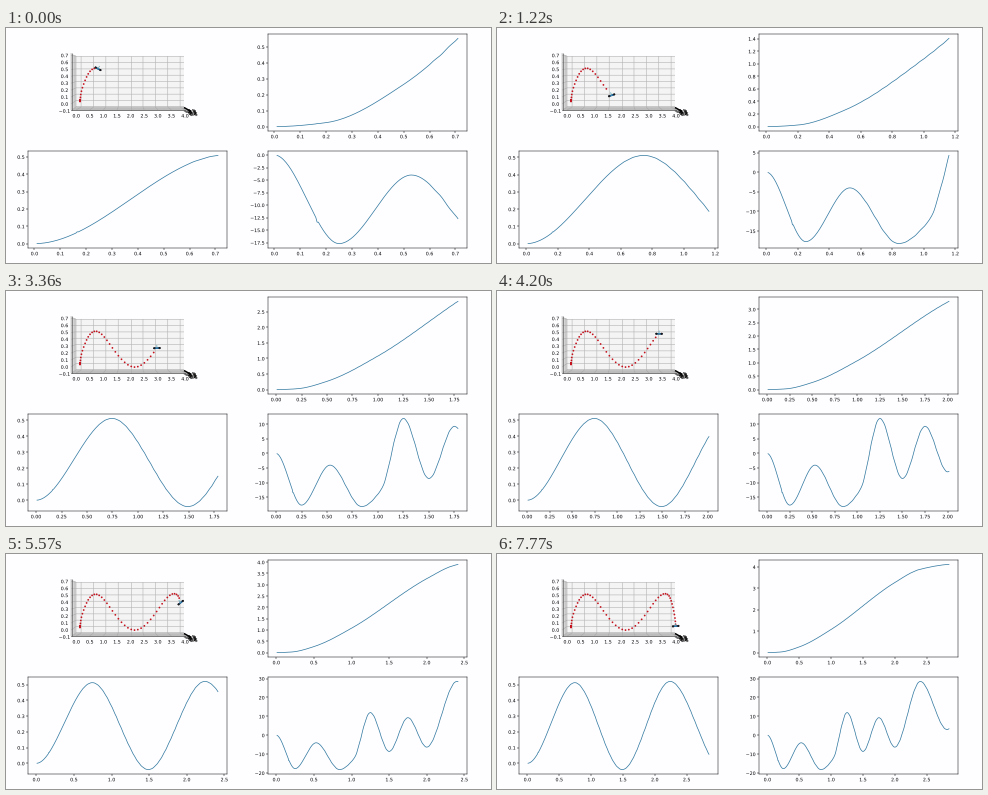
Write a matplotlib script that moves like this. It is 485 by 235 pixels and loops after 7870 ms.

```python
import numpy as np
import matplotlib.pyplot as plt
from matplotlib import patheffects
from matplotlib.animation import FuncAnimation

W, H, DPI = 485, 235, 32
LOOP_MS, FRAMES = 7870, 89
PAPER, RED, BLUE = "#fefdff", "#c41420", "#2f789f"

plt.rcParams.update({
    "font.family": "DejaVu Sans",
    "font.size": 10.6,
    "path.effects": [patheffects.Normal()],  # outlines keep tiny text crisp
    "axes.facecolor": PAPER,
    "axes.linewidth": 1.1,
    "lines.linewidth": 1.6,
})
for axis in ("xtick", "ytick"):
    plt.rcParams.update({f"{axis}.major.size": 3.7, f"{axis}.major.pad": 3.7,
                         f"{axis}.major.width": 1.1})


def curve(*points):
    """Monotone cubic through (t, value) points."""
    tk, vk = np.array(points).T
    h = np.diff(tk)
    d = np.diff(vk) / h
    a, b = d[:-1], d[1:]
    same = a * b > 0
    m = np.zeros(len(tk))
    m[1:-1][same] = 2 * (a * b)[same] / (a + b)[same]

    def f(t):
        i = np.clip(np.searchsorted(tk, t) - 1, 0, len(h) - 1)
        s = (t - tk[i]) / h[i]
        ease = s * s * (3 - 2 * s)
        return (vk[i] + ease * (vk[i + 1] - vk[i])
                + h[i] * s * (1 - s) * ((1 - s) * m[i] - s * m[i + 1]))
    return f


forward = curve((0, 0), (.2, .025), (.5, .265), (1, 1.08),
                (2, 3.27), (2.4, 3.89), (2.9, 4.12))
height = curve((0, 0), (.745, .512), (1.49, -.04), (2.24, .52), (3.07, -.04))
pitch = curve((0, 0), (.25, -17.7), (.53, -4), (.84, -18.2), (1.03, -12.5),
              (1.25, 12), (1.5, -8.6), (1.75, 9.3), (2, -6.3), (2.4, 28.5),
              (2.82, 3))
sim_time = curve((0, .71), (13, 1.16), (37, 1.76), (62, 2.4), (87, 2.85))


def sim_time(k):
    return np.interp(k, [0, 13, 37, 62, 87], [.71, 1.16, 1.76, 2.4, 2.85])


# Logged samples: one late update early on, a faint stutter later
log_t = np.arange(.01, 2.86, .005)
seen_t = np.where((log_t > .16) & (log_t < .17), .17, log_t)
seen_t = seen_t + .0015 * np.sin(2 * np.pi * log_t / .06) * (log_t > .6)

fig = plt.figure(figsize=(W / DPI, H / DPI), dpi=DPI, facecolor=PAPER)


def panel(x, top, f):
    ax = fig.add_axes([x / W, 1 - (top + 97) / H, 199 / W, 97 / H])
    line, = ax.plot([], [], color=BLUE)
    return ax, line, f(seen_t)


panels = [panel(262, 6, forward), panel(22, 123, height), panel(262, 123, pitch)]

# Side view of the flight, drawn in pixel coordinates
view = fig.add_axes([0, 0, 1, 1])
view.set(xlim=(0, W), ylim=(H, 0))
view.axis("off")


def project(x, z, depth):
    """Depth 1 is the front edge, .91 the back pane."""
    return 124.6 + depth * 27.2 * (x - 2), 37 + depth * (39 - 69.4 * z)


def rule(xs, ys, color="#b4b4b4", lw=1.3):
    view.plot(xs, ys, color=color, lw=lw, solid_capstyle="butt")


def label(x, y, value):
    view.text(x, y, f"{value:.1f}".replace("-", "\u2212"),
              ha="center", va="center")


view.fill([70, 178, 178, 70], [28, 28, 79, 79], color="#f4f4f4", lw=0)
view.fill([65, 70, 70, 65], [25, 28, 79, 82], color="#e4e4e4", lw=0)
view.fill([65, 70, 178, 180], [82, 79, 79, 82], color="#dedede", lw=0)

for z in np.arange(-1, 8) / 10:
    y = project(0, z, 1)[1]
    back = project(0, z, .91)[1]
    rule([65, 70, 178], [y, back, back])
    label(58.5, y + .3, z)
for x in np.arange(0, 4.1, .5):
    front = project(x, 0, 1)[0]
    back = project(x, 0, .91)[0]
    rule([back, back, front], [28, 79, 82])
    label(front, 88, x)
for u in np.linspace(0, 1, 5):
    rule([65 + 5 * u] * 2, [25 + 3 * u, 82 - 3 * u], "#a0a0a0", 1)
    rule([65 + 5 * u, 180 - 2 * u], [82 - 3 * u] * 2, "#a0a0a0", 1)
rule([65.5, 65.5], [25, 82], "#505050")
rule([65, 180], [81.5, 81.5], "#303030")

# Depth axis seen end-on: its labels pile up
rule([178, 185], [79.5, 83.5], "black", 3.5)
for u in np.linspace(0, 1, 8):
    label(183 + 5 * u, 83 + 3.5 * u, u - .5)

dots, = view.plot([], [], "o", color=RED, ms=4, mew=0)
view.plot([74], [72.6], "s", color=RED, ms=5, mew=0)
arm, = view.plot([], [], color="#1c2026", lw=3.2)
body, = view.plot([], [], color="#1f6fb0", lw=3.2)
rotors, = view.plot([], [], "o", color="#16181c", ms=4.8, mew=0)
mast, = view.plot([], [], color="#5aa5b4", lw=1.6)


def flight(t):
    return 74 + 25.4 * forward(t), 73.5 - 65 * height(t)


def draw(k):
    now = sim_time(k)
    n = np.searchsorted(log_t, now + .001)
    for ax, line, values in panels:
        line.set_data(log_t[:n], values[:n])
        ax.relim()
        ax.autoscale_view()

    dots.set_data(*flight(np.arange(0, now + .045, .055)))

    # The craft flies slightly ahead of its log
    t = min(now + .09, 2.9)
    cx, cy = flight(t)
    tilt = np.radians(1.6 * pitch(min(t, 2.82)))
    ux, uy = np.cos(tilt), -np.sin(tilt)

    def along(*r):
        r = np.array(r)
        return cx + r * ux, cy + r * uy

    arm.set_data(*along(-3, 3))
    body.set_data(*along(-1.2, 1.6))
    rotors.set_data(*along(-2.6, 2.6))
    mast.set_data([cx, cx + 2.8 * uy], [cy, cy - 2.8 * ux])
    return []


anim = FuncAnimation(fig, draw, frames=FRAMES, interval=LOOP_MS / FRAMES,
                     init_func=lambda: draw(0), repeat=True, repeat_delay=0,
                     blit=False)
plt.show()
```
